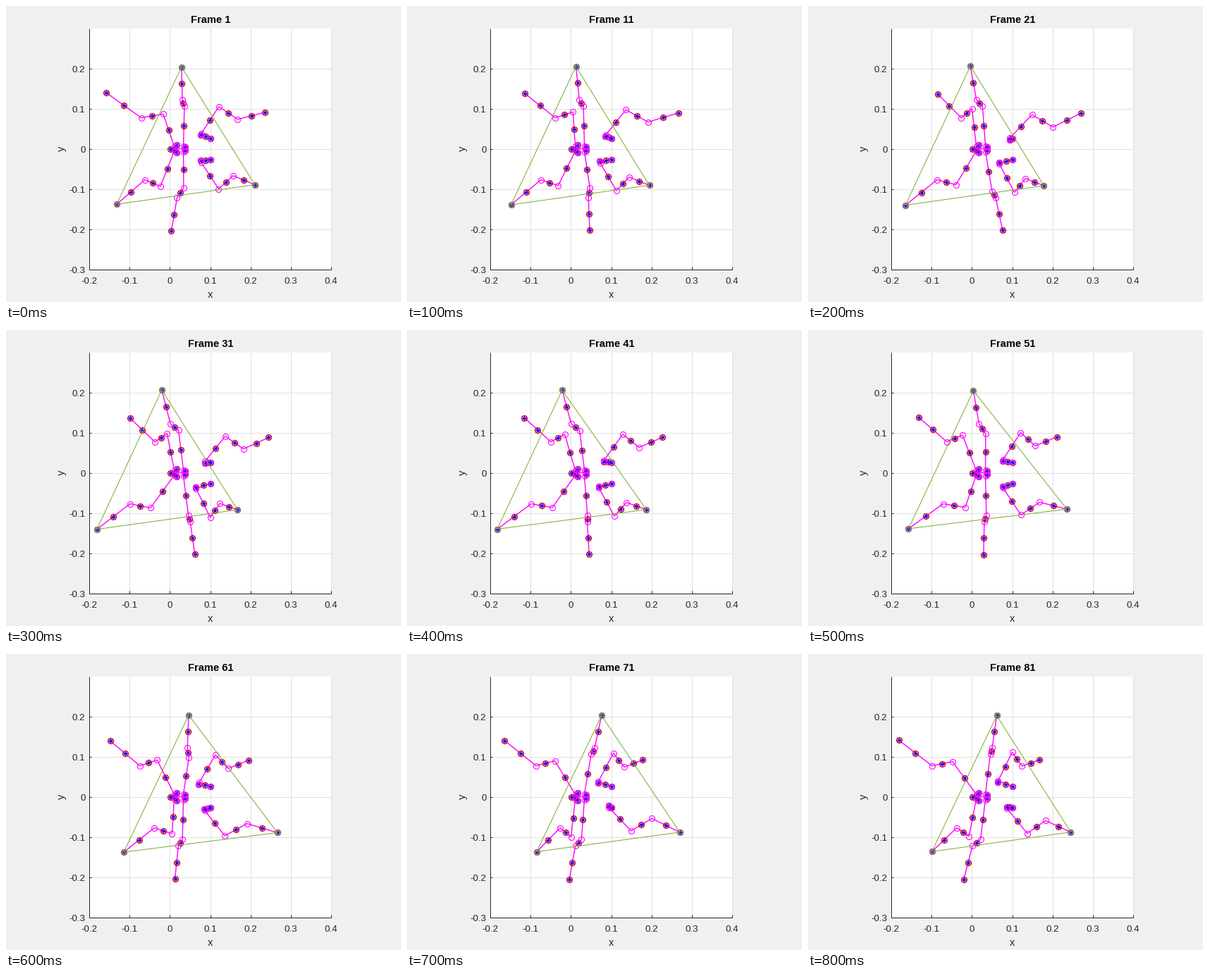
These frames come from a looping animation (560x420 px, 0.9 s). A matplotlib script:

```python
import math
import numpy as np
import matplotlib.pyplot as plt
from matplotlib.animation import FuncAnimation
from matplotlib.patches import Rectangle

W, H, DPI = 560, 420, 100
PX = 72 / DPI                      # points per pixel
X0, Y0, STEP = 231.9, 202.6, 57.1  # plot origin and pixels per 0.1 unit
LEFT, RIGHT, TOP, BOTTOM = 117.5, 460.5, 31.5, 373.5
MAGENTA, GREEN, INK = "#ff00ff", "#77ac30", "#262626"
FONT = "Liberation Sans"

# Gait cycle of 100 steps: a quick swing forward, then a steady push back
CYCLE, SWING_START, SWING = 100, 34, 38
REAR, STROKE = -31, 58

# Each leg: base, foot at rest, and joints as (rest, gain per stride, gain per lift)
LEGS = {
    "hind": dict(base=(242, 5.5), foot=(157, 79), ankle=(197, 0.75, 7),
                 knee=(219, 0.5, 14), spread=(53.5, 0.13, -3)),
    "mid": dict(base=(254, 2.6), foot=(249, 116.3), ankle=(250, 0.6, 1.5),
                knee=(253, 0.3, 4), spread=(60.5, 0, -6.5)),
    "front": dict(base=(290, 14.9), foot=(353, 51.3), ankle=(322, 0.75, -5),
                  knee=(301.5, 0.48, -8), spread=(57, -0.26, 8)),
}
HIP = {"hind": (238.5, 3.5), "mid": (251.5, 4)}
ANKLE_SPREAD = {"hind": 44, "mid": 69.6}
THIGH = 45.5
TRIPOD = [("mid", 1), ("hind", -1), ("front", -1)]


def gait(t):
    """Stride of the foot along x, and how far it is lifted (0 to 1)."""
    p = (t - SWING_START) % CYCLE
    if p < SWING:
        u = (p / SWING) ** 1.3
        return REAR + STROKE * u * u * (3 - 2 * u), math.sin(math.pi * u) ** 2
    return REAR + STROKE * (CYCLE - p) / (CYCLE - SWING), 0


def leg(kind, side, t):
    """Points of a leg from hip to foot, as pixels."""
    phase = (t if (kind, side) in TRIPOD else t + CYCLE / 2) % CYCLE
    stride, lift = gait(phase)
    if kind == "front":            # front legs reach out early in the swing
        stride += 29 * math.exp(-((phase - 53) / 15) ** 2)
    spec = LEGS[kind]

    def joint(name):
        rest, a, b = spec[name]
        return rest + a * stride + b * lift

    knee_x, knee, ankle_x = joint("knee"), joint("spread"), joint("ankle")
    foot_x, foot = spec["foot"]
    foot += 1.2 * math.cos(2 * math.pi * (phase - 30) / CYCLE)
    if kind == "front":
        hip_x = 276 + 0.6 * (knee_x - 300.5)
        hip = hip_x, knee - math.sqrt(THIGH ** 2 - (knee_x - hip_x) ** 2)
        ankle = knee - 22 + 0.15 * (ankle_x - knee_x)
    else:
        hip, ankle = HIP[kind], ANKLE_SPREAD[kind]
    pts = np.array([hip, (knee_x, knee), (ankle_x, ankle), (foot_x + stride, foot)])
    pts[:, 1] = Y0 - side * pts[:, 1]
    return pts


def pose(t):
    gap = [(np.nan, np.nan)]
    links = [(233, Y0), (254, Y0)] + gap
    joints, masses, feet = [], [(233, Y0), (238, Y0)], {}
    for kind, spec in LEGS.items():
        for side in (1, -1):
            pts = leg(kind, side, t)
            bx, by = spec["base"]
            base = np.array([bx, Y0 - side * by])
            links += [base, *pts] + gap
            joints += [base, *pts[:3]]
            masses += [base, *(pts[:-1] + pts[1:]) / 2, pts[3]]
            if kind == "front":
                twin = pts[0] + (-0.5, side * 2.5)
                joints.append(twin)
                masses += [(base + pts[0]) / 2 + (0, side), twin]
            feet[kind, side] = pts[3]
    tri = [feet[k] for k in TRIPOD]
    return [np.array(p, float).T for p in (links, joints, masses, masses, tri + tri[:1])]


fig = plt.figure(figsize=(W / DPI, H / DPI), dpi=DPI, facecolor="#f0f0f0")
ax = fig.add_axes([0, 0, 1, 1])
ax.set_xlim(0, W)
ax.set_ylim(H, 0)
ax.axis("off")


def label(x, y, s, size=13.33, **kw):
    kw = {"ha": "center", "va": "baseline", "color": INK, **kw}
    return ax.text(x, y, s, fontname=FONT, fontsize=size * PX, **kw)


def rule(x, y, color):
    ax.plot(x, y, color=color, lw=PX, solid_capstyle="butt", zorder=1)


ax.add_patch(Rectangle((LEFT, TOP), RIGHT - LEFT, BOTTOM - TOP, fc="white", lw=0, zorder=0))
xticks = [(k, math.floor(X0 + k * STEP) + 0.5) for k in range(-2, 5)]
yticks = [(k, math.floor(Y0 - k * STEP) + 0.5) for k in range(-3, 3)]
for k, x in xticks:
    rule([x, x], [TOP, BOTTOM], "#dfdfdf")
    label(x + 0.5, 393.5, f"{k / 10:g}")
for k, y in yticks:
    rule([LEFT, RIGHT], [y, y], "#dfdfdf")
    label(112.5, y + 5.5, f"{k / 10:g}", ha="right")
for k, x in xticks:
    rule([x, x], [BOTTOM, BOTTOM - 3.5], INK)
for k, y in yticks:
    rule([LEFT, LEFT + 3.5], [y, y], INK)
rule([LEFT, LEFT], [TOP, BOTTOM], INK)
rule([LEFT, RIGHT], [BOTTOM, BOTTOM], INK)
label(290, 413.5, "x", 14.67)
label(79, 202.5, "y", 14.67, va="center", rotation=90)
title = label(290, 24.5, "", 14.67, weight="bold", color="black")


def layer(color, marker, z, line="none", size=8, width=1.0, edge=1.1):
    return ax.plot([], [], color=color, marker=marker, ls=line, lw=width * PX, ms=size * PX,
                   mfc="none", mew=edge * PX, zorder=z)[0]


layers = [
    layer(MAGENTA, "o", 2, "-", width=1.4),
    layer(MAGENTA, "o", 5),
    layer("#ff0000", "o", 3, edge=1.3),
    layer("#0000ff", (8, 2, 0), 4, size=7, edge=0.7),
    layer(GREEN, "o", 6, "-", edge=0.8),
]
layers[0].set_marker("")


def draw(i):
    t = 1 + 10 * i
    title.set_text(f"Frame {t}")
    for line, pts in zip(layers, pose(t)):
        line.set_data(*pts)
    return [title, *layers]


anim = FuncAnimation(fig, draw, frames=9, interval=100, repeat=True, repeat_delay=0)
plt.show()
```
